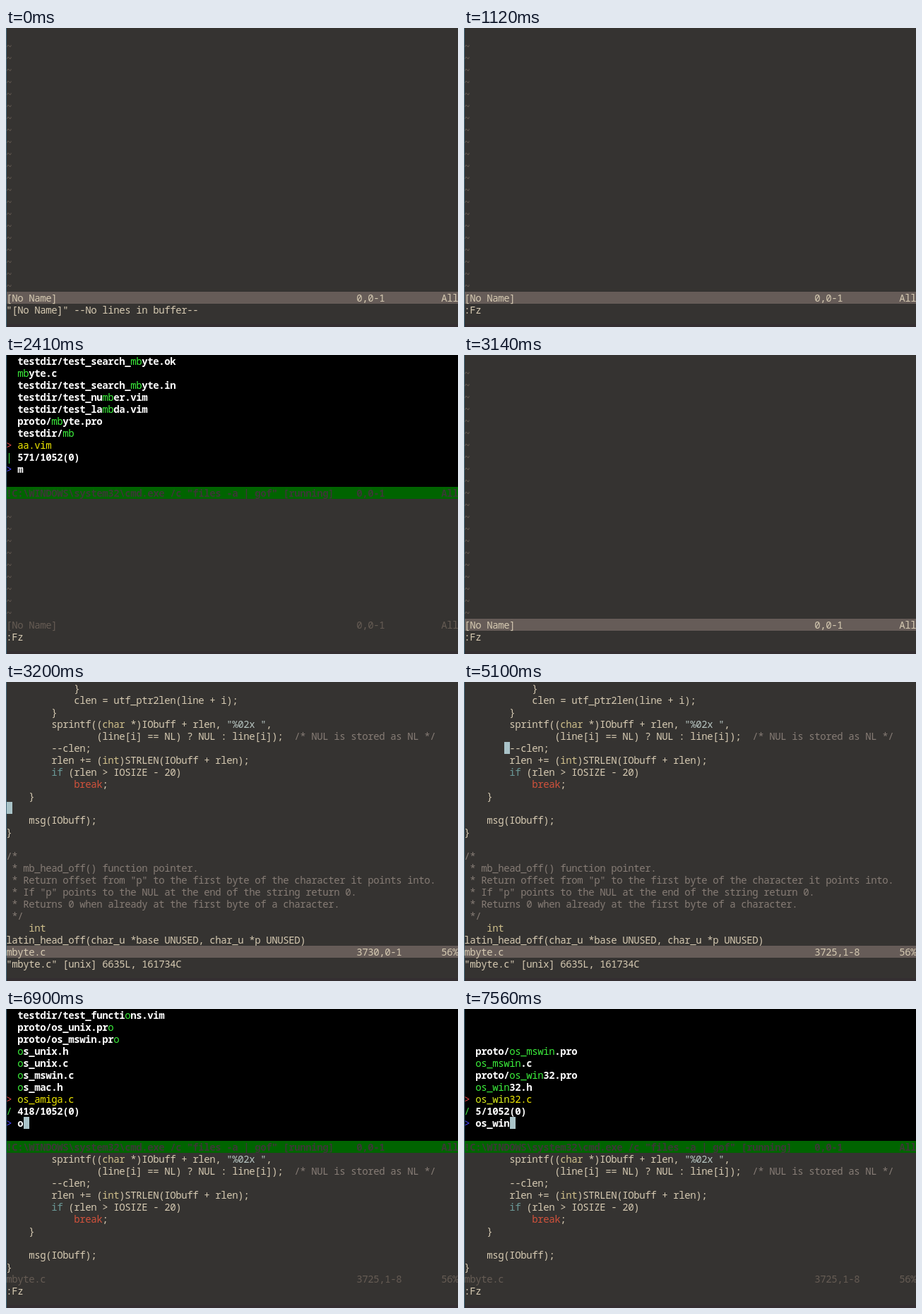
Write an HTML page with a canvas that moves like this. It is 640 px wide and 424 px high and loops after 8000 ms.

```html
<!DOCTYPE html>
<html lang="en">
<head>
<meta charset="utf-8">
<title>Fuzzy file finder in a text editor</title>
<style>
html, body { margin: 0; width: 100%; height: 100%; overflow: hidden; background: #353331; }
canvas { display: block; }
</style>
</head>
<body>
<canvas id="screen" width="640" height="424"></canvas>
<script>
const ctx = document.getElementById('screen').getContext('2d');
const LOOP = 8000, CW = 8, LH = 17;
const FONT = '14px "Noto Sans Mono", "DejaVu Sans Mono", monospace';
const C = {
  bg: '#353331', fg: '#d6cab2', dim: '#665c54', bar: '#665c58', comment: '#867c75',
  cursor: '#a9c3c8', green: '#006400', match: '#3cf03c', yellow: '#f0e800'
};

const code = `            }
            clen = utf_ptr2len(line + i);
        }
        sprintf((char *)IObuff + rlen, "%02x ",
                (line[i] == NL) ? NUL : line[i]);  /* NUL is stored as NL */
        --clen;
        rlen += (int)STRLEN(IObuff + rlen);
        if (rlen > IOSIZE - 20)
            break;
    }

    msg(IObuff);
}

/*
 * mb_head_off() function pointer.
 * Return offset from "p" to the first byte of the character it points into.
 * If "p" points to the NUL at the end of the string return 0.
 * Returns 0 when already at the first byte of a character.
 */
    int
latin_head_off(char_u *base UNUSED, char_u *p UNUSED)`.split('\n');

// Result lists, top to bottom; the last entry is the selected one.
const words = s => s.trim().split(/\s+/);
const allFiles = words('blowfish.c bigvim.bat beval.h beval.c ascii.h arabic.h arabic.c aa.vim');
const mFiles = words(`GvimExt/Makefile
  testdir/dumps/Test_terminal_dumpload_dump_multibyte_01.dump
  Make_mvc.mak Make_ming.mak Make_cyg.mak Makefile bigvim.bat aa.vim`);
const mbPartial = words(`testdir/test_search_mbyte.ok mbyte.c testdir/test_search_mbyte.in
  testdir/test_number.vim testdir/test_lambda.vim proto/mbyte.pro testdir/mb aa.vim`);
const mbFiles = words(`testdir/test_search_mbyte.ok testdir/test_search_mbyte.in
  testdir/test_number.vim testdir/test_lambda.vim testdir/mbyte.vim proto/mbyte.pro mbyte.c`);
const mbyteFiles = mbFiles.filter(f => f.includes('mbyte'));
const oFiles = words(`testdir/test_functions.vim proto/os_unix.pro proto/os_mswin.pro
  os_unix.h os_unix.c os_mswin.c os_mac.h os_amiga.c`);
const osFiles = words(`proto/os_unix.pro proto/os_mswin.pro os_unix.h os_vms.c
  os_mswin.c os_win32.h os_win32.c os_mac.h`);
const winFiles = words('proto/os_mswin.pro os_mswin.c proto/os_win32.pro os_win32.h os_win32.c');

const find = (query, list, count, spin, shown = query) =>
  ({ query, list, count, spin, shown, cur: [2 + shown.length, 9] });
const up = (row, col, pos) => ({ cur: [col, row], pos });

// Each step changes some fields of the screen state.
const steps = [
  [0, { lines: [], name: '[No Name]', pos: '0,0-1', pct: 'All', pending: '',
        cmd: '"[No Name]" --No lines in buffer--', cur: null, term: false, dim: false, list: null }],
  [250, { cur: [0, 0] }],
  [690, { cur: null }],
  [840, { cur: [0, 0], pending: ',' }],
  [1120, { cur: null, pending: '', cmd: ':Fz' }],
  [1180, { term: true, dim: true, cur: [0, 0] }],
  [1920, find('', allFiles, 1052, '|')],
  [2290, find('m', allFiles, 1052, '|')],
  [2350, find('m', mFiles, 571, '|')],
  [2410, { ...find('mb', mbPartial, 571, '|', 'm'), cur: null }],
  [2470, find('mb', mbFiles, 23, '/')],
  [2560, find('mby', mbyteFiles, 6, '-')],
  [2650, find('mbyt', mbyteFiles, 5, '\\')],
  [2740, find('mbyte', mbyteFiles, 5, '|')],
  [3140, { term: false, dim: false, list: null, cur: null }],
  [3200, { lines: code, name: 'mbyte.c', pos: '3730,0-1', pct: '56%',
           cmd: '"mbyte.c" [unix] 6635L, 161734C', cur: [0, 10] }],
  [3690, { cur: null }],
  [3940, { cur: [0, 10] }],
  [4180, up(9, 0, '3729,1')],
  [4430, up(8, 7, '3728,1-8')],
  [4730, up(7, 7, '3727,1-8')],
  [4910, up(6, 7, '3726,1-8')],
  [5100, up(5, 7, '3725,1-8')],
  [5780, { cur: null }],
  [5840, { cur: [7, 5], pending: ',' }],
  [6050, { cur: null, pending: '', cmd: ':Fz' }],
  [6080, { term: true }],
  [6110, { dim: true, cur: [0, 0] }],
  [6820, find('', allFiles, 1052, '|')],
  [6900, find('o', oFiles, 418, '/')],
  [7240, find('os_', osFiles, 31, '-')],
  [7480, find('os_w', winFiles, 5, '\\')],
  [7520, find('os_wi', winFiles, 5, '|')],
  [7560, find('os_win', winFiles, 5, '/')]
];

function box(x, y, w, h, color) {
  ctx.fillStyle = color;
  ctx.fillRect(x, y, w, h);
}

// Writes text on the character grid and returns the next column.
function put(text, col, row, color = C.fg, bold = false) {
  ctx.fillStyle = color;
  ctx.font = (bold ? 'bold ' : '') + FONT;
  for (const ch of text) {
    if (ch !== ' ') ctx.fillText(ch, col * CW + 4.5, row * LH + 14);
    col++;
  }
  return col;
}

const rules = [
  [/^\/\*.*/, C.comment],
  [/^"[^"]*"/, '#b6c4c0'],
  [/^if\b/, '#6b9a98'],
  [/^break\b/, '#d2523c'],
  [/^(int|char)\b/, '#d0c08c'],
  [/^(\w+|\W)/, C.fg]
];

function putCode(line, row) {
  if (line.startsWith(' *')) return put(line, 0, row, C.comment);
  let col = 0;
  while (line) {
    const [re, color] = rules.find(([re]) => re.test(line));
    const token = line.match(re)[0];
    col = put(token, col, row, color);
    line = line.slice(token.length);
  }
}

function putStatus(row, name, pos, pct, color, bold) {
  put(name, 0, row, color, bold);
  put(pos, 62, row, color, bold);
  put(pct, 77, row, color, bold);
}

function putResult(file, row, query, selected) {
  const base = selected ? C.yellow : '#fff';
  const hit = selected ? '#dcf01c' : C.match;
  const parts = query && file.match(new RegExp('^(.*)(' + [...query].join('.*?') + ')(.*)$'));
  if (selected) put('>', 0, row, '#e84848');
  if (!parts) return put(file, 2, row, base, !selected);
  let col = put(parts[1], 2, row, base, !selected);
  col = put(parts[2], col, row, hit);
  put(parts[3], col, row, base, !selected);
}

function drawTerminal(s) {
  box(1, 0, 639, 11 * LH, '#000');
  box(1, 11 * LH, 639, LH, C.green);
  putStatus(11, '!C:\\WINDOWS\\system32\\cmd.exe /c "files -a | gof" [running]',
    '0,0-1', 'All', '#3c3836', true);
  if (!s.list) return;
  const top = 8 - s.list.length;
  s.list.forEach((file, i) => putResult(file, top + i, s.query, top + i === 7));
  put(s.spin, 0, 8, '#3cdc3c');
  put(s.count + '/1052(0)', 2, 8, '#fff', true);
  put('>', 0, 9, '#4848ff');
  put(s.shown, 2, 9, '#fff', true);
}

function drawBuffer(s) {
  const first = s.term ? 12 : 0;
  for (let row = first; row < 22; row++) {
    if (!s.lines.length) {
      if (row > first) put('~', 0, row, C.dim);
    } else if (s.term && !s.dim && row === 21) {
      putCode(s.lines[21].replace('l', ' '), row);
    } else {
      putCode(s.lines[s.term ? row - 9 : row], row);
    }
  }
}

function draw(t) {
  const s = {};
  for (const [at, change] of steps) if (at <= t) Object.assign(s, change);
  ctx.textAlign = 'center';
  box(0, 0, 640, 424, C.bg);
  box(0, 420, 640, 4, '#342e31');
  drawBuffer(s);
  if (s.term) drawTerminal(s);
  if (!s.dim) box(1, 22 * LH, 639, LH, C.bar);
  putStatus(22, s.name, s.pos, s.pct, s.dim ? C.dim : C.fg);
  put(s.cmd, 0, 23);
  put(s.pending, 69, 24);
  if (s.cur) box(1 + s.cur[0] * CW, s.cur[1] * LH, CW, LH, C.cursor);
  box(0, 0, 1, 424, '#44687c');
}

const start = performance.now();
function tick() {
  draw((performance.now() - start) % LOOP);
  requestAnimationFrame(tick);
}
tick();
</script>
</body>
</html>
```
